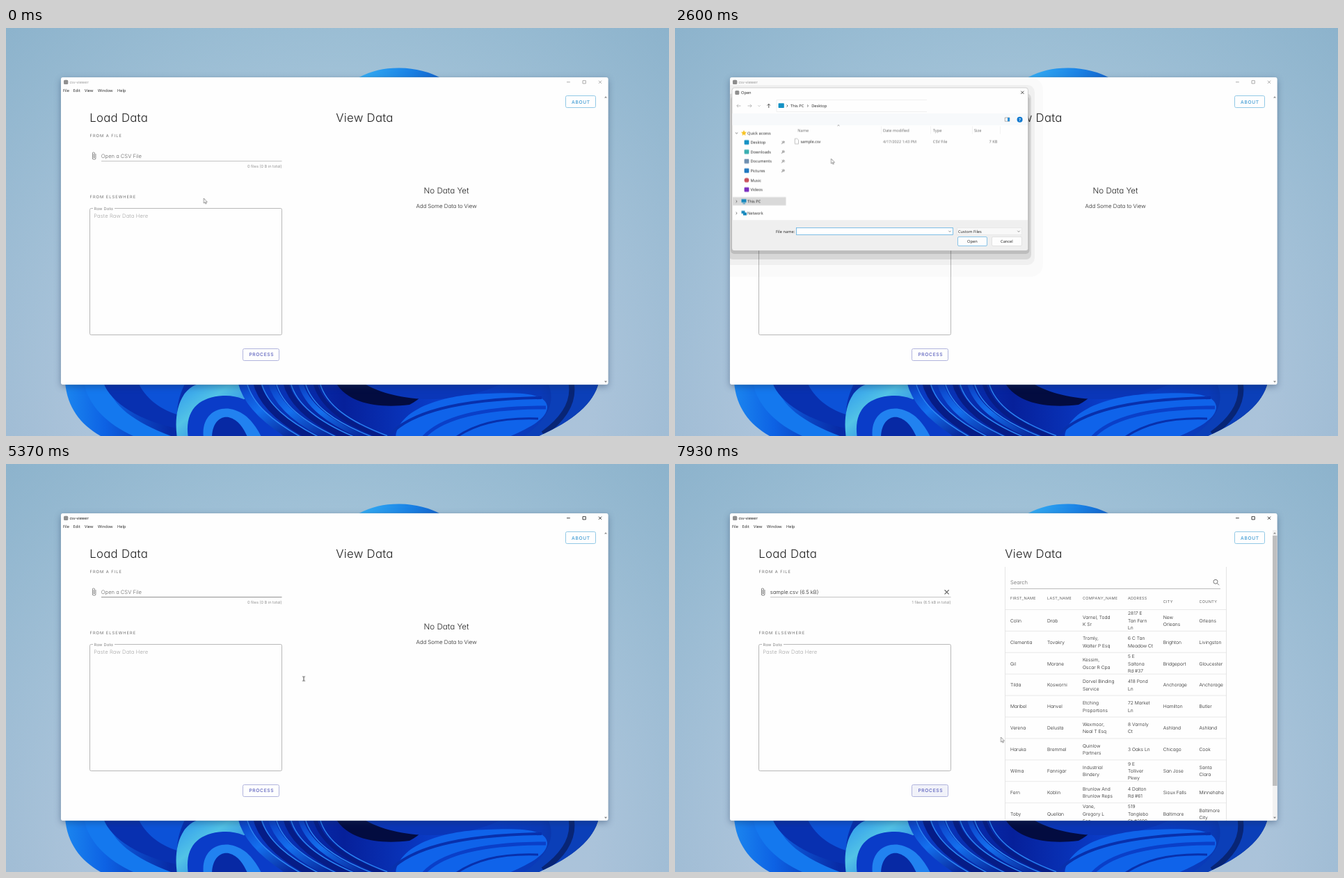
An HTML page that plays this animation: 953 px wide and 587 px high, repeating every 8000 ms.

```html
<!DOCTYPE html>
<html lang="en">
<head>
<meta charset="utf-8">
<title>csv-viewer</title>
<style>
html, body { margin: 0; width: 100%; height: 100%; overflow: hidden; background: #a6c2d8; }
svg { display: block; }
text { font-family: Inter, Lato, sans-serif; font-weight: 350; font-feature-settings: "cv11"; text-rendering: geometricPrecision; fill: #222; }
.h1 { font-size: 16.8px; letter-spacing: .25px; }
.h2 { font-size: 11.6px; }
.over { font-size: 5.8px; letter-spacing: 1px; fill: #444; }
.body { font-size: 7.6px; }
.add { font-size: 7.9px; }
.small { font-size: 5.7px; fill: #777; }
.btn { font-size: 6.7px; font-weight: 450; letter-spacing: .65px; }
.th { font-size: 5.5px; letter-spacing: .33px; fill: #333; }
.td { font-size: 6.7px; }
.mid { text-anchor: middle; }
.end { text-anchor: end; }
.sys text { font-family: "Open Sans", "Noto Sans", sans-serif; font-weight: 400; font-size: 5.7px; }
.sys .dim { fill: #666; }
.line { fill: none; stroke: currentColor; stroke-width: .8; }

/* One loop is 8 s, so 1% is 80 ms. */
.anim { animation: 8s step-end infinite; }
#shade { filter: drop-shadow(0 3px 5px rgba(20, 45, 85, .38)); }
#caption { animation-name: caption; }
#fieldLine { animation-name: fieldLine; }
#clip, #clear { animation-name: accent; }
.empty { animation-name: empty; }
.filled { animation-name: filled; }
#dialog { animation-name: dialog; transform-origin: 295px 203px; }
#late { animation-name: late; }
#list { animation-name: settle; }
#hover { animation-name: hover; }
#selected { animation-name: selected; }
#fileName { animation-name: named; }
#fileBox { animation-name: fileBox; }
#combo { animation-name: combo; }
#openBtn { animation-name: openBtn; }
#processFill { animation-name: processFill; }
.noData { animation-name: noData; }
.hasData { animation-name: hasData; }
#cursor { animation: move 8s linear infinite; }
#arrow { animation-name: arrow; }
#beam { animation-name: beam; }
#hand { animation-name: hand; }

@keyframes caption { 0% { color: #999 } 28.12% { color: #111 } 30.7% { color: #999 } 67.1%, 100% { color: #111 } }
@keyframes fieldLine { 0% { color: #b4b4b4 } 24.7% { color: #777 } 70.6% { color: #1976d2 } 86.2%, 100% { color: #b4b4b4 } }
@keyframes accent { 0% { color: #777 } 70.6% { color: #1976d2 } 86.2%, 100% { color: #666 } }
@keyframes empty { 0% { opacity: 1 } 70.6%, 100% { opacity: 0 } }
@keyframes filled { 0% { opacity: 0 } 70.6%, 100% { opacity: 1 } }
@keyframes dialog {
  0% { opacity: 0; transform: scale(.95) }
  29.8% { opacity: 0; transform: scale(.95); animation-timing-function: ease-out }
  31.6% { opacity: 1; transform: none }
  67.1%, 100% { opacity: 0; transform: none }
}
@keyframes late { 0% { opacity: 0 } 33.37%, 100% { opacity: 1 } }
@keyframes settle { 0% { transform: translateY(-.5px) } 33.37%, 100% { transform: none } }
@keyframes hover { 0% { opacity: 0 } 42% { opacity: 1 } 44.6%, 100% { opacity: 0 } }
@keyframes selected { 0% { opacity: 0 } 44.6%, 100% { opacity: 1 } }
@keyframes named { 0% { opacity: 0 } 46.3%, 100% { opacity: 1 } }
@keyframes fileBox { 0% { stroke: #5fb0e2 } 44.6%, 100% { stroke: #c4c4c4 } }
@keyframes combo { 0% { fill: #f8f8f8; stroke: #e6e6e6 } 55.8% { fill: #dcecf8; stroke: #69aee0 } 60.2%, 100% { fill: #f8f8f8; stroke: #e6e6e6 } }
@keyframes openBtn { 0% { fill: #fdfdfd } 59.3% { fill: #eaf4fc } 64.7%, 100% { fill: #d3e8f8 } }
@keyframes processFill {
  0% { fill-opacity: 0 }
  81% { fill-opacity: .05 }
  86.2% { fill-opacity: .2; animation-timing-function: ease-out }
  92.2%, 100% { fill-opacity: .07 }
}
@keyframes noData { 0% { opacity: 1 } 88.8%, 100% { opacity: 0 } }
@keyframes hasData { 0% { opacity: 0 } 88.8%, 100% { opacity: 1 } }
@keyframes move {
  0%, 14.6% { transform: translate(284.3px, 245px); animation-timing-function: ease-in-out }
  24.7%, 35.4% { transform: translate(224.5px, 188px); animation-timing-function: ease-in-out }
  44.6%, 45.9% { transform: translate(205px, 163px); animation-timing-function: ease-in-out }
  55.8% { transform: translate(406px, 290px) }
  58.5% { transform: translate(423.5px, 297.5px); animation-timing-function: ease-out }
  61.5%, 73.5% { transform: translate(423.5px, 304.5px); animation-timing-function: ease-in-out }
  79.2% { transform: translate(387px, 452.5px); animation-timing-function: ease-out }
  83.6%, 95% { transform: translate(375px, 470px); animation-timing-function: ease-in-out }
  99.1%, 100% { transform: translate(468.5px, 393px) }
}
@keyframes arrow { 0% { opacity: 1 } 22.7% { opacity: 0 } 29.8% { opacity: 1 } 67.1% { opacity: 0 } 71.5% { opacity: 1 } 81% { opacity: 0 } 96.4%, 100% { opacity: 1 } }
@keyframes beam { 0% { opacity: 0 } 22.7% { opacity: 1 } 29.8% { opacity: 0 } 67.1% { opacity: 1 } 71.5%, 100% { opacity: 0 } }
@keyframes hand { 0% { opacity: 0 } 81% { opacity: 1 } 96.4%, 100% { opacity: 0 } }
</style>
</head>
<body>
<svg width="953" height="587" viewBox="0 0 953 587">
  <defs>
    <linearGradient id="sky" x2="0" y2="1"><stop offset="0" stop-color="#a2c3d8"/><stop offset="1" stop-color="#abc3da"/></linearGradient>
    <radialGradient id="corners" gradientUnits="userSpaceOnUse" cx="476" cy="480" r="680">
      <stop offset=".55" stop-color="#7ea8c4" stop-opacity="0"/><stop offset="1" stop-color="#7ea8c4" stop-opacity=".6"/>
    </radialGradient>
    <linearGradient id="crest"><stop offset="0" stop-color="#35b0f5"/><stop offset=".6" stop-color="#1b84e6"/><stop offset="1" stop-color="#1263cc"/></linearGradient>
    <linearGradient id="petals">
      <stop offset="0" stop-color="#1c88f0"/><stop offset=".08" stop-color="#0d62e4"/><stop offset=".2" stop-color="#082ba6"/>
      <stop offset=".35" stop-color="#0a3cc6"/><stop offset=".52" stop-color="#06209a"/><stop offset=".7" stop-color="#0a3ecb"/>
      <stop offset=".88" stop-color="#0a3ab8"/><stop offset="1" stop-color="#0a2878"/>
    </linearGradient>
    <linearGradient id="cyan" x2="1" y2="1"><stop offset="0" stop-color="#2a93ef"/><stop offset=".4" stop-color="#52c3e6"/><stop offset="1" stop-color="#1561e4"/></linearGradient>
    <linearGradient id="fold" x2=".6" y2="1"><stop offset="0" stop-color="#0a3ac2"/><stop offset=".5" stop-color="#1470ee"/><stop offset="1" stop-color="#082a9e"/></linearGradient>
    <clipPath id="bloomClip"><path d="M85 510C88 545 106 570 136 587H766C815 565 845 540 852 510Z"/></clipPath>
    <clipPath id="winClip"><rect x="79" y="71" width="786.5" height="442" rx="3"/></clipPath>
    <path id="cross" d="M-2.1-2.1 2.1 2.1M2.1-2.1-2.1 2.1"/>
    <path id="lens" d="M1.3 1.3 4 4M2-1a3 3 0 1 1-6 0a3 3 0 1 1 6 0"/>
    <path id="right" d="M-1-1.5 .6 0-1 1.5"/>
    <path id="down" d="M-1.7-.8 0 .9 1.7-.8"/>
  </defs>

  <rect width="953" height="587" fill="url(#sky)"/>
  <rect width="953" height="587" fill="url(#corners)"/>
  <path d="M504 73Q531 57 566 57.5Q600 58 627 73Z" fill="url(#crest)"/>
  <g id="bloom" clip-path="url(#bloomClip)"><path d="M80 505H860V590H80Z" fill="url(#petals)"/></g>

  <rect id="shade" x="79" y="71" width="786.5" height="442" rx="3" fill="#fff" stroke="#9db0c0" stroke-width=".5"/>
  <g clip-path="url(#winClip)">
    <rect x="79" y="71" width="787" height="442" fill="#fefefe"/>
    <g class="sys">
      <rect x="83" y="74.8" width="6.3" height="6.3" rx="1.6" fill="#909090"/>
      <g id="caption" class="anim">
        <text x="91.4" y="80" style="fill:currentColor">csv-viewer</text>
        <path class="line" d="M806 77.8h4.8M829 75.7h4.3v4.2h-4.3Z"/>
        <use href="#cross" class="line" x="854" y="77.8"/>
      </g>
      <text x="82" y="92">File</text><text x="96.6" y="92">Edit</text><text x="113" y="92">View</text>
      <text x="132" y="92">Window</text><text x="160" y="92">Help</text>
    </g>

    <rect x="804.5" y="97.5" width="43" height="17" rx="2" fill="none" stroke="#86c3e4" stroke-width=".9"/>
    <text class="btn" x="813" y="108.5" style="fill:#3f9bd3">ABOUT</text>
    <text class="h1" x="120.3" y="135">Load Data</text>
    <text class="h1" x="474.3" y="135">View Data</text>
    <text class="over" x="120.5" y="156.8">FROM A FILE</text>

    <path id="clip" class="anim" transform="translate(120.4 178) scale(.5)" fill="currentColor" d="M16.5 6v11.5a4 4 0 0 1-8 0V5a2.5 2.5 0 0 1 5 0v10.5a1 1 0 0 1-2 0V6H10v9.5a2.5 2.5 0 0 0 5 0V5a4 4 0 0 0-8 0v12.5a5.5 5.5 0 0 0 11 0V6Z"/>
    <path id="fieldLine" class="line anim" d="M137 191.5H396.5"/>
    <g class="empty anim">
      <text class="body" x="136.8" y="186.9" style="fill:#666">Open a CSV File</text>
      <text class="small end" x="396.5" y="201">0 files (0 B in total)</text>
    </g>
    <g class="filled anim">
      <text class="body" x="136.8" y="186.9">sample.csv (6.5 kB)</text>
      <g id="clear" class="anim"><use href="#cross" class="line" transform="translate(390.6 184.3) scale(1.45)"/></g>
      <text class="small end" x="396.5" y="201">1 files (6.5 kB in total)</text>
    </g>

    <text class="over" x="120.5" y="245.1">FROM ELSEWHERE</text>
    <rect x="120.5" y="259.5" width="276" height="182" rx="2" fill="none" stroke="#a6a6a6" stroke-width=".8"/>
    <path d="M125 259.5H156" stroke="#fefefe" stroke-width="3"/>
    <text class="small" x="126.5" y="261.6" style="letter-spacing:.2px;fill:#666">Raw Data</text>
    <text class="body" x="126.2" y="273.4" style="letter-spacing:.13px;fill:#a5a5a5">Paste Raw Data Here</text>
    <rect id="processFill" class="anim" x="340.5" y="461.5" width="52" height="17" rx="2" fill="#5058b8" stroke="#a9acda" stroke-width=".9"/>
    <text class="btn" x="349.4" y="472.4" style="fill:#5a5fbd">PROCESS</text>

    <g class="noData anim">
      <text class="h2 mid" x="633" y="237.9">No Data Yet</text>
      <text class="add mid" x="633" y="259.3">Add Some Data to View</text>
    </g>
    <g id="table" class="hasData anim">
      <path class="line" color="#dedede" d="M474.5 148V513M792.5 148V513"/>
      <text class="body" x="482" y="173.4" style="fill:#666">Search</text>
      <path class="line" color="#aaa" d="M482 179.5H784"/>
      <use href="#lens" class="line" color="#555" x="778" y="170.3"/>
    </g>
    <g class="hasData anim"><path d="M859 95h7v418h-7Z" fill="#f2f2f2"/><path d="M859 103h7v360h-7Z" fill="#bfbfbf"/></g>
    <path d="M860 100.6l2-2.4 2 2.4ZM860 507.8l2 2.4 2-2.4Z" fill="#8a8a8a"/>

    <g id="dialog" class="anim sys">
      <g fill="#000">
        <rect x="60" y="71" width="469" height="287" rx="18" fill-opacity=".015"/>
        <rect x="70" y="82" width="447" height="259" rx="10" fill-opacity=".04"/>
        <rect x="76" y="94" width="436" height="239" rx="7" fill-opacity=".1"/>
        <rect x="80" y="98" width="429.5" height="227" rx="5" fill-opacity=".12"/>
      </g>
      <rect x="82" y="86" width="425.5" height="234" rx="3.5" fill="#fefefe" stroke="#c2c2c2" stroke-width=".7"/>
      <path d="M82.4 123H507V140H82.4Z" fill="#f7f9fb"/>
      <path d="M82.4 276.3H507V317a3 3 0 0 1-3 3H85.4a3 3 0 0 1-3-3Z" fill="#efefef"/>
      <rect x="86.3" y="90" width="6" height="6" rx="1.5" fill="#909090"/>
      <text x="95" y="95">Open</text>
      <use href="#cross" class="line" color="#222" x="499.4" y="92.8"/>
      <path class="line" color="#aaa" d="M94.5 112H88.8l2.2-2.2M88.8 112l2.2 2.2M104.5 112h5.7l-2.2-2.2M110.2 112l-2.2 2.2"/>
      <use href="#down" class="line" color="#bbb" x="121" y="112"/>
      <path class="line" color="#333" d="M134.8 115v-5.7l-2.2 2.2M134.8 109.3l2.2 2.2"/>
      <path class="line" color="#ececec" d="M362 103.5H146V120.5H362"/>
      <rect x="148.6" y="108.2" width="8.2" height="6.8" rx=".8" fill="#1592c4"/>
      <g class="line" color="#444"><use href="#right" x="161.5" y="112"/><use href="#right" x="191" y="112"/></g>
      <text x="166" y="114">This PC</text><text x="196.2" y="114">Desktop</text>
      <g id="late" class="anim">
        <path class="line" color="#ececec" d="M362 103.5H398V120.5H362M403 103.5H501.5V120.5H403Z"/>
        <use href="#down" class="line" color="#555" x="371.5" y="112"/>
        <path class="line" color="#444" d="M392.3 110.3a2.5 2.5 0 1 0 .5 2M392.6 108.8v1.8h-1.8"/>
        <text class="dim" x="406.5" y="114">Search Desktop</text>
        <use href="#lens" class="line" color="#444" transform="translate(494.5 112) scale(-.65 .65)"/>
        <text x="91" y="134.3">Organize</text><text x="134" y="134.3">New folder</text>
        <path d="M117 131l1 1.3 1-1.3ZM461 131l1 1.3 1-1.3Z" fill="#333"/>
        <path d="M449.5 129.7h6.5M449.5 131.7h6.5M449.5 133.7h6.5" stroke="#444" stroke-width="1.1"/>
      </g>
      <path d="M474.3 129h6.6v5.2h-6.6Z" fill="#fff" stroke="#777" stroke-width=".6"/><path d="M478 129h3v5.2h-3Z" fill="#2b8fd6"/>
      <circle cx="495.6" cy="131.8" r="4" fill="#0d78cf"/><text class="mid" x="495.6" y="134" style="fill:#fff;font-weight:700">?</text>

      <g id="list" class="anim">
        <path class="line" color="#f0f0f0" d="M296.5 142V153M367.5 142V153M427.5 142V153M467.5 142V153"/>
        <path class="line" color="#888" d="M233.5 141.3l1.5-1.2 1.5 1.2"/>
        <rect id="hover" class="anim" x="168.5" y="157.6" width="296.7" height="12.6" fill="#e5f3ff"/>
        <rect id="selected" class="anim" x="168.5" y="157.6" width="296.7" height="12.6" fill="#c9e6fb" stroke="#9fd0f2" stroke-width=".7"/>
        <text class="dim" x="176.3" y="149.6">Name</text><text class="dim" x="299" y="149.6">Date modified</text>
        <text class="dim" x="370.8" y="149.6">Type</text><text class="dim" x="430" y="149.6">Size</text>
        <path d="M172.3 159.8h3.4l1.8 1.8v5.6h-5.2Z" fill="#fff" stroke="#999" stroke-width=".6"/>
        <text x="180.4" y="166">sample.csv</text><text class="dim" x="299" y="166" style="font-size:5.5px">4/17/2022 1:43 PM</text>
        <text class="dim" x="370.8" y="166">CSV File</text><text class="dim end" x="463.4" y="166">7 KB</text>
        <path d="M83 243.7H159.5V255.7H83Z" fill="#d9d9d9"/>
        <g class="line" color="#555"><use href="#down" x="88.6" y="151.7"/><use href="#right" x="88.6" y="250"/><use href="#right" x="88.6" y="267"/></g>
        <path d="M99 147.4l1.2 2.7 2.9.3-2.2 2 .7 2.9-2.6-1.5-2.6 1.5.7-2.9-2.2-2 2.9-.3Z" fill="#f7c325"/>
        <text x="104" y="153.8">Quick access</text>
        <path d="M95.5 246.8h7v4.8h-7ZM97.5 252.5h3.5v1h-3.5ZM95.5 263.5h5v4h-5ZM98 266h5v4h-5Z" fill="#1688bd"/>
        <text x="104" y="252.2">This PC</text><text x="104" y="269.2">Network</text>
      </g>

      <text x="145" y="294.6">File name:</text>
      <rect id="fileBox" class="anim" x="174.5" y="287.5" width="225" height="10" fill="#fff" stroke-width=".8"/>
      <text id="fileName" class="anim" x="176" y="294.6">sample.csv</text>
      <rect id="combo" class="anim" x="405.5" y="287.5" width="93" height="10" stroke-width=".8"/>
      <text x="407" y="294.6">Custom Files</text>
      <g class="line" color="#777"><use href="#down" x="395" y="292.5"/><use href="#down" x="494" y="292.5"/></g>
      <rect id="openBtn" class="anim" x="406.5" y="300.5" width="42" height="13" rx="1.5" stroke="#6bb5e3" stroke-width=".8"/>
      <rect x="455.5" y="300.5" width="43" height="13" rx="1.5" fill="#fdfdfd" stroke="#dcdcdc" stroke-width=".8"/>
      <text class="mid" x="427.4" y="309.2">Open</text><text class="mid" x="476.9" y="309.2">Cancel</text>
    </g>
  </g>

  <g id="cursor">
    <path id="arrow" class="anim" d="M0 0V7.1L1.6 5.7 2.7 8.1 3.8 7.6 2.8 5.3H4.9Z" fill="#fff" stroke="#555" stroke-width=".6"/>
    <path id="beam" class="anim" d="M2.7 1.3Q4.5 1.3 4.5 2.2Q4.5 1.3 6.3 1.3M4.5 2V7M2.7 7.7Q4.5 7.7 4.5 6.8Q4.5 7.7 6.3 7.7" fill="none" stroke="#222" stroke-width=".8"/>
    <path id="hand" class="anim" d="M1.6 5.6V.8Q2.1 0 2.6.8V3.6L5.4 4.3Q6 4.5 5.9 5.4L5.2 9.4H2.2L.2 6.3Q.5 5.2 1.6 5.6Z" fill="#fff" stroke="#444" stroke-width=".6"/>
  </g>
</svg>
<script>
const NS = "http://www.w3.org/2000/svg";
const byId = id => document.getElementById(id);

function add(parent, tag, attrs, content = "") {
  const node = document.createElementNS(NS, tag);
  for (const key in attrs) node.setAttribute(key, attrs[key]);
  node.textContent = content;
  parent.append(node);
  return node;
}

// Wallpaper folds
const bloom = byId("bloom");
const shape = (d, fill) => add(bloom, "path", { d, fill });
const ribbon = (d, stroke, width) => add(bloom, "path", { d, stroke, fill: "none", "stroke-width": width });

shape("M112 510C118 545 150 574 190 590H245C190 570 150 545 146 510Z", "#1478ee");
shape("M140 510C150 540 195 566 246 576C244 550 250 528 262 510Z", "#0830b0");
shape("M190 510C200 532 220 548 246 556C246 540 250 526 258 510Z", "#0c52d8");
shape("M246 590C240 550 252 510 290 510H330C352 520 352 536 330 538C290 540 290 565 300 590Z", "url(#cyan)");
shape("M262 590C256 552 275 531 312 529C350 527 375 555 400 590Z", "#0a3cc8");
shape("M284 590C280 560 300 545 322 548C345 552 358 570 368 590Z", "#2182f0");
shape("M296 590C296 570 306 558 320 560C336 564 342 578 348 590Z", "#0729a4");
for (let i = 0; i < 6; i++) {
  const x = 338 + i * 21;
  ribbon(`M${x} 505C${x + 6} 540 ${x + 40} 570 ${x + 88 + i * 6} 596`, i % 2 ? "#061c86" : "url(#fold)", 11 - i);
  ribbon(`M${x + 7} 505C${x + 13} 540 ${x + 47} 568 ${x + 96 + i * 6} 594`, "#2b86f2", 1.4);
}
shape("M474 510C490 538 530 548 580 542C596 534 606 522 612 510Z", "#030c40");
shape("M512 510C560 540 650 544 716 510Z", "#0a36b8");
shape("M560 592C560 552 620 528 690 526C740 524 776 525 778 545C778 566 740 580 715 592Z", "#0f63ea");
ribbon("M545 594C570 556 640 534 770 532", "#0830ac", 4);
ribbon("M596 594C620 562 680 546 776 546", "#0a3fc8", 5);
ribbon("M640 594C670 570 710 560 765 562", "#0830ac", 3);
shape("M778 510C792 535 780 565 740 590H775C815 570 845 540 852 510Z", "#0b3fb8");
ribbon("M812 508C818 535 805 560 772 584", "#082575", 8);

// Dialog sidebar
const places = [["Desktop", "#1592c4"], ["Downloads", "#39aeb0"], ["Documents", "#6f8fb0"], ["Pictures", "#2078c0"], ["Music", "#c9505c"], ["Videos", "#7a2fc0"]];
places.forEach(([name, fill], i) => {
  const y = 165 + i * 13.6;
  add(byId("list"), "rect", { x: 99.6, y: y - 3.2, width: 6.8, height: 6.4, rx: name === "Music" ? 3.2 : 1, fill });
  add(byId("list"), "text", { x: 108.4, y: y + 2.2 }, name);
  if (i < 4) add(byId("list"), "path", { d: `M153.3 ${y + 2.2}l1.8-1.8M154 ${y - 1.5}l2.8 2.8M155.7 ${y - 2}l2 2`, stroke: "#555" });
});

// Data table; "|" breaks a line
const columns = [482, 535, 586, 651, 701.7, 753.5];
const headers = "FIRST_NAME,LAST_NAME,COMPANY_NAME,ADDRESS,CITY,COUNTY".split(",");
const rows = `Colin;Drab;Varnel, Todd|K Sr;2817 E|Tan Fern|Ln;New|Orleans;Orleans
Clementia;Tovakry;Tromly,|Walter P Esq;6 C Tan|Meadow Ct;Brighton;Livingston
Gil;Morane;Kessim,|Oscar R Cpa;5 E|Saltona|Rd #37;Bridgeport;Gloucester
Tilda;Kosworni;Dorvel Binding|Service;418 Pond|Ln;Anchorage;Anchorage
Maribel;Hanvel;Etching|Proportions;72 Market|Ln;Hamilton;Butler
Verena;Delusta;Wexmoor,|Neal T Esq;8 Varnoly|Ct;Ashland;Ashland
Haruka;Bremmel;Quinlow|Partners;3 Oaks Ln;Chicago;Cook
Wilma;Fannigar;Industrial|Bindery;9 E|Tolliver|Pkwy;San Jose;Santa|Clara
Fern;Koblin;Brunlow And|Brunlow Reps;4 Dalton|Rd #61;Sioux Falls;Minnehaha
Toby;Quellan;Vane,|Gregory L|Esq;519|Tanglebo|Ct #3100;Baltimore;Baltimore|City`.split("\n");

const table = byId("table");
headers.forEach((name, i) => add(table, "text", { class: "th", x: columns[i], y: i < 4 ? 195.2 : 199.6 }, name));
rows.forEach((row, r) => {
  const top = 209.5 + r * 30.9;
  add(table, "path", { d: `M475 ${top}H792`, class: "line", color: "#e4e4e4" });
  row.split(";").forEach((cell, c) => {
    const lines = cell.split("|");
    lines.forEach((line, n) => {
      const y = top + 18.2 + (n - (lines.length - 1) / 2) * 10.4;
      add(table, "text", { class: "td", x: columns[c], y }, line);
    });
  });
});
</script>
</body>
</html>
```
